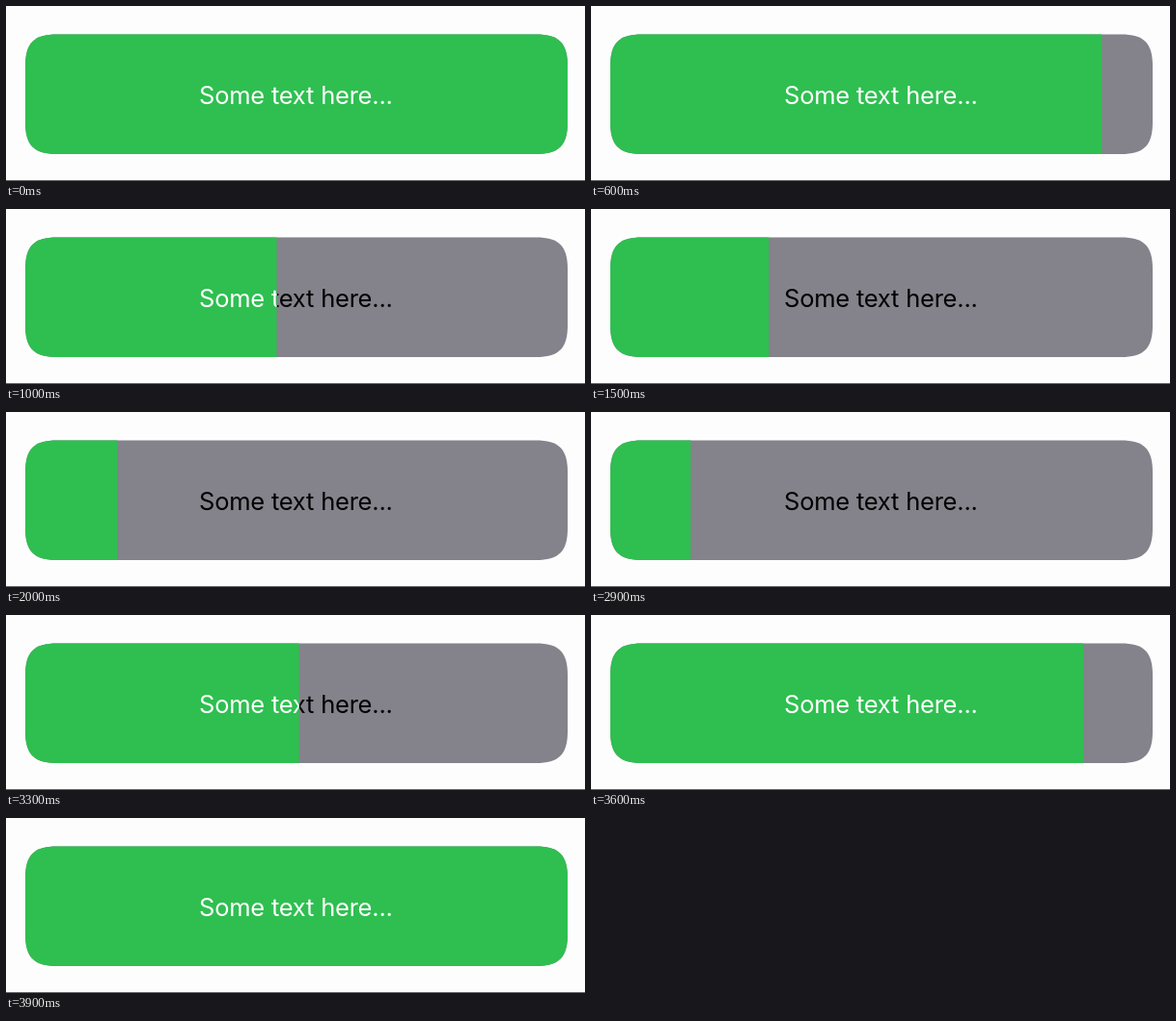
Recreate the animation shown at these times as an HTML page. Size 600 by 182 pixels, loop 4800 ms.

```html
<!DOCTYPE html>
<html lang="en">
<head>
<meta charset="utf-8">
<title>Progress button</title>
<style>
html, body { margin: 0; width: 100%; height: 100%; overflow: hidden; background: #fefdfe; }
svg { display: block; }
text { font: 400 25.5px Inter, "Liberation Sans", sans-serif; letter-spacing: -.22px; }
</style>
</head>
<body>
<svg width="600" height="182" viewBox="0 0 600 182">
  <defs>
    <clipPath id="bar">
      <path d="M20 62.5c0-24 9-33 33-33H549c24 0 33 9 33 33V121c0 24-9 33-33 33H53c-24 0-33-9-33-33z"/>
    </clipPath>
    <clipPath id="done"><rect id="fill" height="182"/></clipPath>
    <text id="label" x="200" y="102">Some text here...</text>
  </defs>
  <g clip-path="url(#bar)">
    <rect width="600" height="182" fill="#84828a"/>
    <use href="#label"/>
    <g clip-path="url(#done)">
      <rect width="600" height="182" fill="#2ebf50"/>
      <use href="#label" fill="#fff"/>
    </g>
  </g>
  <rect y="181" width="600" height="1" fill="#6b6b6b"/>
</svg>
<script>
const LOOP = 4800, STEP = 100, FULL = 582;
const fill = document.getElementById("fill");

// Each move slides the edge to a new x; skew above 1 delays the ease, below 1 hastens it.
const moves = [
  { start: 500, end: 1000, to: 280, skew: .82 },
  { start: 1200, end: 1600, to: 166, skew: 1 },
  { start: 1800, end: 2200, to: 64, skew: 1 },
  { start: 2500, end: 3815, to: FULL, skew: 1.5 }
];

function ease(u, skew) {
  const v = Math.min(Math.max(u, 0), 1) ** skew;
  return v * v * (3 - 2 * v);
}

function edgeAt(t) {
  return moves.reduce((x, { start, end, to, skew }) =>
    x + (to - x) * ease((t - start) / (end - start), skew), FULL);
}

function draw() {
  const t = performance.now() % LOOP;
  fill.setAttribute("width", edgeAt(Math.floor(t / STEP) * STEP) + .5);
  requestAnimationFrame(draw);
}
draw();
</script>
</body>
</html>
```
